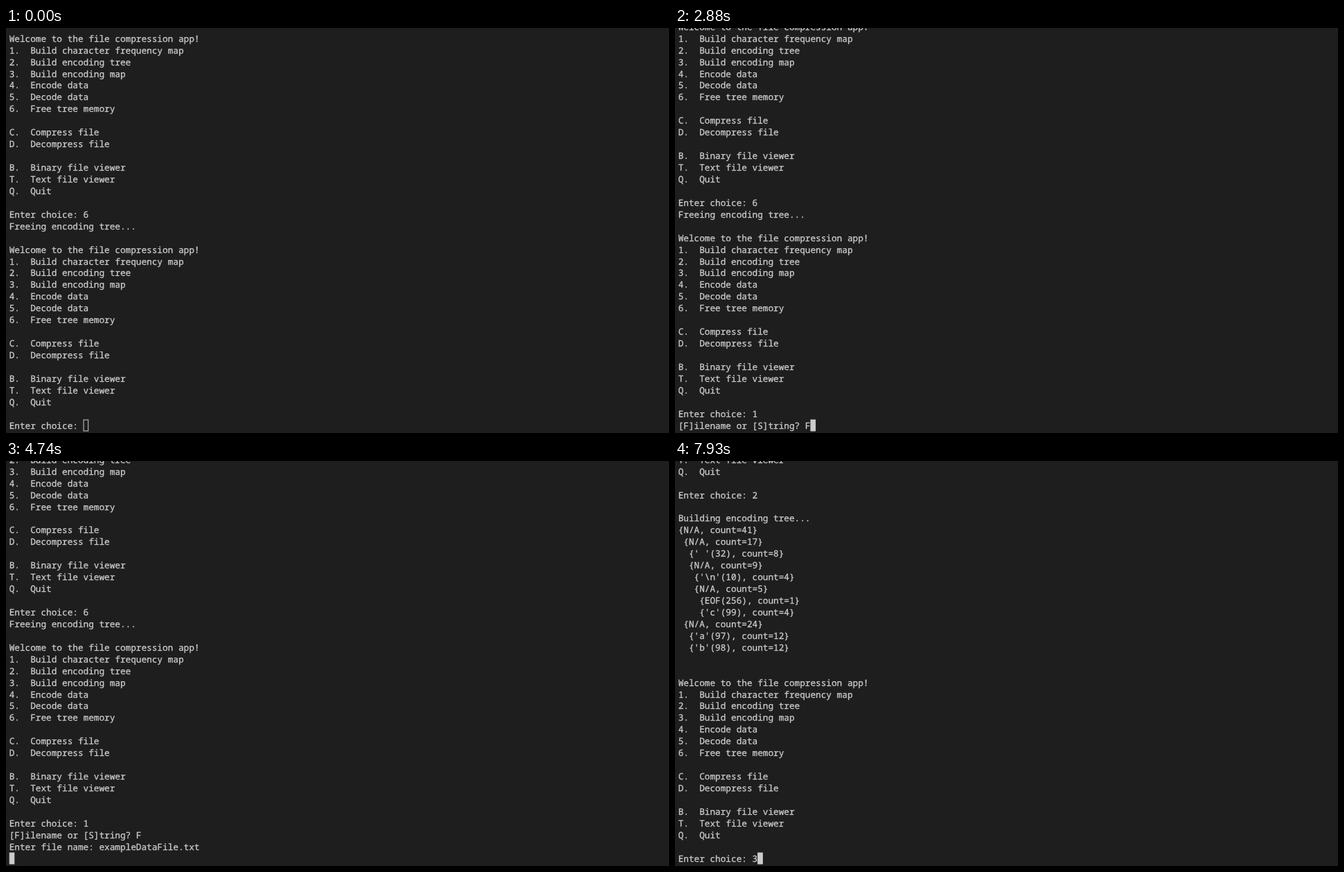
Write an HTML page that moves like this. It is 957 px wide and 585 px high and loops after 8000 ms.

```html
<!DOCTYPE html>
<html lang="en">
<head>
<meta charset="utf-8">
<title>Terminal session</title>
<style>
  html, body { margin: 0; width: 100%; height: 100%; overflow: hidden; background: #1e1e1e; }
  svg { display: block; width: 957px; height: 585px; }
  text {
    font: 12.72px "Noto Sans Mono", "DejaVu Sans Mono", monospace;
    font-variant-ligatures: none;
    text-rendering: geometricPrecision;
    white-space: pre;
    fill: #ccc;
    stroke: #ccc;
    stroke-width: 0.3px;
  }
</style>
</head>
<body>
<svg viewBox="0 0 957 585"><g id="screen"></g><rect id="cursor" stroke="#ccc"/></svg>
<script>
const LOOP = 8000, FOCUS_AT = 820;
const LEFT = 4.7, CELL = 7.63, PITCH = 16.94;
const LAST_ROW = 33, LAST_BASELINE = 578.7;

const menu = `Welcome to the file compression app!
1.  Build character frequency map
2.  Build encoding tree
3.  Build encoding map
4.  Encode data
5.  Decode data
6.  Free tree memory

C.  Compress file
D.  Decompress file

B.  Binary file viewer
T.  Text file viewer
Q.  Quit

Enter choice: `;

const frequencies = [
  [98, "'b'", 12], [99, "'c'", 4], [10, "'\\n'", 4],
  [97, "'a'", 12], [32, "' '", 8], [256, "EOF", 1]
].map(([code, name, count]) =>
  `${code}:`.padEnd(8) + name.padEnd(8) + "-->".padEnd(8) + count).join("\n");

const tree = `{N/A, count=41}
 {N/A, count=17}
  {' '(32), count=8}
  {N/A, count=9}
   {'\\n'(10), count=4}
   {N/A, count=5}
    {EOF(256), count=1}
    {'c'(99), count=4}
 {N/A, count=24}
  {'a'(97), count=12}
  {'b'(98), count=12}`;

// Each entry appends its text to the terminal at the given time.
const writes = [
  [0, `${menu}6\nFreeing encoding tree...\n\n${menu}`],
  [1760, "1"],
  [1890, "\n"],
  [1960, "[F]ilename or [S]tring? "],
  [2880, "F"],
  [3150, "\nEnter file name: "],
  [4270, "exampleDataFile.txt"],
  [4740, "\n"],
  [4810, `\nBuilding frequency map...\n${frequencies}\n\n\n${menu}`],
  [6210, "2"],
  [6610, `\n\nBuilding encoding tree...\n${tree}\n\n\n${menu}`],
  [7930, "3"]
];

const screen = document.getElementById("screen");
const cursor = document.getElementById("cursor");

function setAttributes(node, attributes) {
  for (const name in attributes) node.setAttribute(name, attributes[name]);
}

// Rows run from the bottom up; the top one is partly cut off.
const rows = Array.from({ length: LAST_ROW + 2 }, (_, i) => {
  const row = document.createElementNS("http://www.w3.org/2000/svg", "text");
  setAttributes(row, { x: LEFT, y: LAST_BASELINE - i * PITCH });
  return screen.appendChild(row);
});

function render(time) {
  const log = writes.filter(([at]) => at <= time).map(([, text]) => text).join("");
  const lines = log.split("\n").reverse();
  rows.forEach((row, i) => {
    const line = lines[i] || "";
    if (row.textContent !== line) row.textContent = line;
  });
  setAttributes(cursor, {
    x: LEFT + lines[0].length * CELL + 0.5,
    y: 566, width: CELL - 1, height: 16,
    fill: time < FOCUS_AT ? "none" : "#ccc"
  });
}

const start = performance.now();
function tick() {
  render((performance.now() - start) % LOOP);
  requestAnimationFrame(tick);
}
tick();
</script>
</body>
</html>
```
